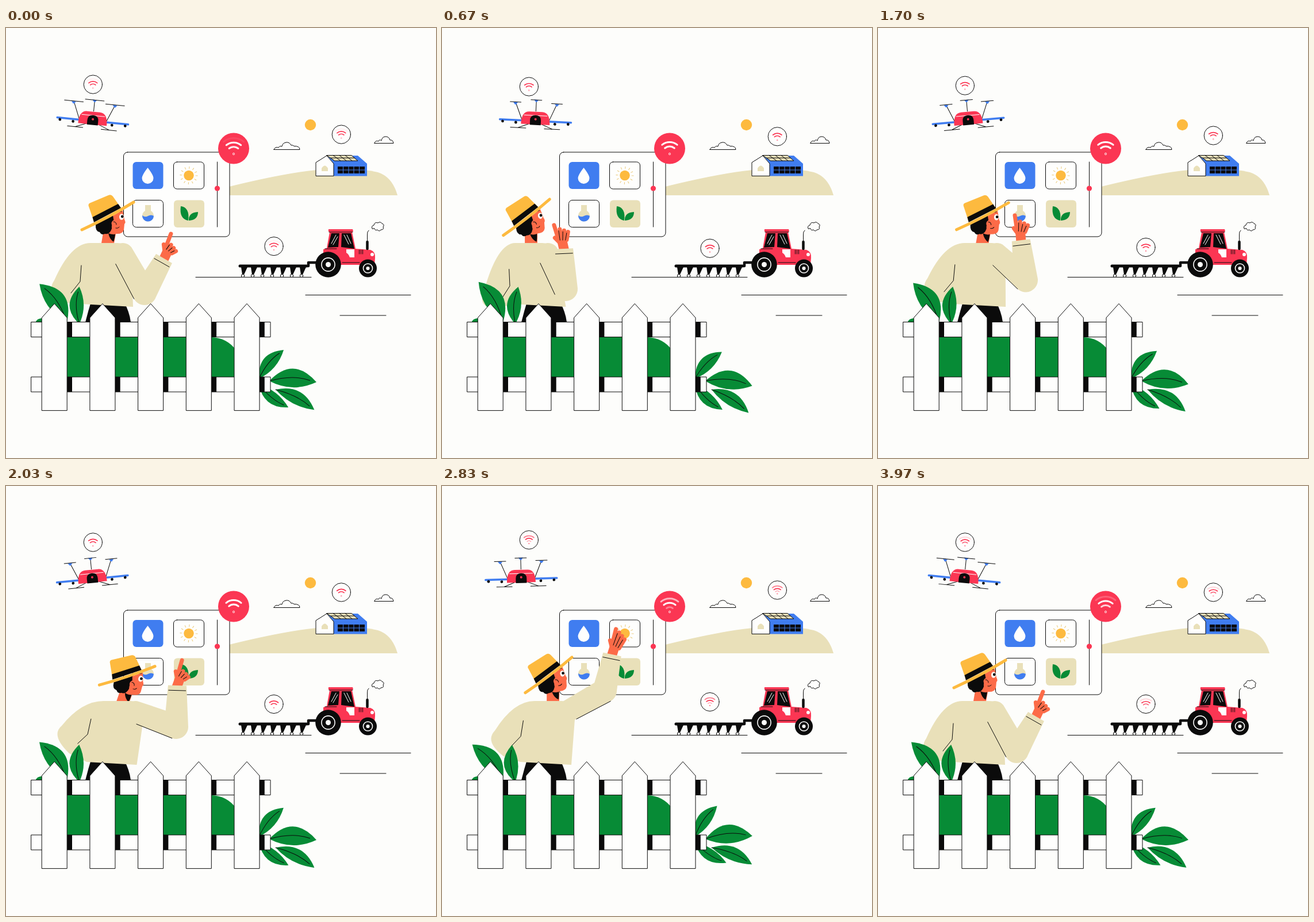
Animation of 748 by 748 pixels, one loop 4010 ms. Source, as an HTML page:

```html
<!DOCTYPE html>
<html lang="en">
<head>
<meta charset="utf-8">
<title>Smart farm</title>
<style>
html, body { margin: 0; width: 100%; height: 100%; overflow: hidden; background: #fdfdfb; }
svg { display: block; width: 100vw; height: 100vh; fill: none; stroke-linecap: round; stroke-linejoin: round; }
.k { fill: #0b0b0b; } .w { fill: #fefefd; } .r { fill: #fb3653; } .b { fill: #407df0; }
.g { fill: #078b36; } .s { fill: #e9e0b9; } .o { fill: #fdba3f; } .f { fill: #fc6b48; }
.l { stroke: #0b0b0b; stroke-width: 1; }
</style>
</head>
<body>
<svg viewBox="0 0 748 748">
  <!-- hill, sky and barn -->
  <path class="s" d="M380 291V278Q480 253 540 247Q605 241 647 251Q672 259 681 291Z"/>
  <circle class="o" cx="529.5" cy="168.5" r="9.7"/>
  <path class="l w" d="M466 211.500H511Q511 205 501 205.500Q499 203 496 204Q493 198 487 199Q481 200 480 206Q476 204 474 208Q468 206 466 211.500Z"/>
  <path class="l w" d="M641 200.500H674Q673 194 668 195Q666 188 659 189Q654 190 653 196Q650 193 648 197Q642 195 641 200.500Z"/>
  <path class="b" d="M559 222H612L628 236V257.500H570V236Z"/>
  <path class="l s" d="M558 221.500H601L612 231H572Z"/>
  <path class="l" d="M565 226H606M569 221.500L582 231M580 221.500L592 231M590 221.500L602 231"/>
  <path class="l w" d="M539 257V234L558 222L570 236V257Z"/>
  <path class="s" d="M549 249V244Q554.500 235 560 244V249Z"/>
  <path class="k" d="M577 241H624V253H577Z"/>
  <path d="M577 247H624M586.500 241V253M596 241V253M605 241V253M614.500 241V253" stroke="#407df0"/>

  <!-- field and tractor -->
  <path class="l" d="M330 433.500H531M521 464.500H704M581 500H661"/>
  <g id="teeth"></g>
  <path d="M407 414H522" stroke="#0b0b0b" stroke-width="5"/>
  <path d="M523 414H526V408H546" stroke="#0b0b0b" stroke-width="4.500"/>
  <path class="r" d="M552 385L558 383L563 355Q560 355 561 350H603Q605 355 602 355L608 384L634 386Q643 389 642 400L641 412H552Z"/>
  <path class="k" d="M566 357H580L578 381L560 382ZM584 357H600L606 384L583 381Z"/>
  <path d="M562 355H603" class="l"/>
  <path d="M566 375L574 360M569 377L577 363M588 360L596 376M593 360L600 375" stroke="#fff"/>
  <path class="w" d="M592 385H606V399H598Q596 393 592 391Z"/>
  <path class="l" d="M555 384H575M614.500 386V393M617.500 386V393M620.500 386V393M585 408H615"/>
  <circle class="w" cx="637" cy="394" r="3"/>
  <path d="M628.500 372V384" stroke="#0b0b0b" stroke-width="4.500"/>
  <path class="l" d="M628.500 370V360Q628 354 631 352"/>
  <path class="l w" d="M637 349Q635 344 640 343Q641 337 647 339Q651 336 654 340Q659 342 656 346Q658 351 652 351Q650 355 646 351Q642 353 641 349Z"/>
  <g id="wheels"></g>

  <g id="drone">
    <path d="M-62 0H-20M20 0H62" stroke="#407df0" stroke-width="3.500"/>
    <path d="M-24 -2L-36 -31M24 -2L36 -31M0 -17V-36" class="l"/>
    <path class="b" d="M-40 -31H-32L-35 -27H-37ZM32 -31H40L37 -27H35ZM-4 -37H4L1 -33H-1Z"/>
    <path class="l" id="props"/>
    <path class="l" d="M-43 13H-16M16 13H43M-10 5L-30 13M10 5L30 13"/>
    <path class="r" d="M-25 6Q-25 -16 -11 -16H11Q25 -16 25 6Z"/>
    <path d="M-20 -9.500H20" stroke="#fff"/>
    <path class="k" d="M-9.500 7V-1Q-9.500 -10 0 -10Q9.500 -10 9.500 -1V7Z"/>
    <circle class="r" cy="-3" r="2"/>
    <g class="k"><circle cx="-57" cy="3" r="2.400"/><circle cx="-34" cy="4" r="2.400"/><circle cx="34" cy="4" r="2.400"/><circle cx="57" cy="3" r="2.400"/></g>
  </g>

  <!-- control panel -->
  <rect class="l w" x="204.500" y="216" width="184.500" height="147" rx="7"/>
  <rect class="b" x="220.500" y="233" width="53" height="47" rx="6"/>
  <path class="w" d="M246.500 243Q256.500 256 256.500 261A10 10 0 0 1 236.500 261Q236.500 256 246.500 243Z"/>
  <rect class="l w" x="291.500" y="233" width="53" height="47" rx="6"/>
  <circle class="o" cx="318" cy="256.500" r="8.700"/>
  <circle cx="318" cy="256.500" r="13.500" stroke="#e9c878" stroke-width="4" stroke-dasharray="1 6.070" stroke-linecap="butt"/>
  <rect class="l w" x="220.500" y="299.500" width="53" height="47" rx="6"/>
  <path class="s" d="M242 308H252V318A10 10 0 1 1 242 318Z"/>
  <path class="b" d="M237 326Q242 330 247 327Q252 324 257 327A10 10 0 0 1 237 326Z"/>
  <rect class="s" x="292" y="299.500" width="53" height="47.500" rx="6"/>
  <path class="g" d="M317 335Q320 312 304 310Q301 332 317 335ZM318 335Q317 321 334 320Q334 334 318 335Z"/>
  <path class="l" d="M367.500 233V346"/>
  <circle class="r" cx="367.500" cy="279" r="4.600"/>
  <circle class="r" cx="396" cy="209.500" r="27"/>
  <g id="signals"></g>

  <!-- farmer -->
  <path class="k" d="M148 476H205Q215 494 217 512H138Q143 492 148 476Z"/>
  <g id="head">
    <path class="f" d="M178 331L203 317L206 333Q209 338 206 341L205 351Q203 359 191 358L187 380H165L170 350Z"/>
    <path class="k" d="M178 357Q185 360 190 358.500Q189 367 187 372Q180 367 178 357Z"/>
    <path class="k" d="M156 342L186 326L188 338Q183 340 184 349Q180 360 172 358Q166 361 163 355Q155 354 156 342Z"/>
    <circle class="f" cx="190" cy="340" r="6.500"/>
    <path class="l" d="M187 337Q192 337 192 342M191 348Q195 349 197 346M196 320L201 319"/>
    <ellipse class="w" cx="201" cy="328.500" rx="4" ry="5.300"/>
    <circle class="k" cx="202.300" cy="328" r="2.400"/>
    <path class="o" d="M153 337L143.500 309Q143 306 146 304.500L178 291Q183 289 186 293L200 313Z"/>
    <path class="k" d="M150.500 329L195 306L200 313L153 338Z"/>
    <path d="M132 351Q178 330 222 303" stroke="#fdba3f" stroke-width="5"/>
  </g>
  <g id="hand" stroke="#fc6b48">
    <path d="M0 8V-14" stroke-width="17"/>
    <path d="M-4 -11L-11 -22" stroke-width="7"/>
    <path id="fingers" stroke-width="7"/>
    <path class="l" id="gaps"/>
  </g>
  <path class="s" id="body"/>
  <path class="l" id="folds"/>

  <!-- garden -->
  <g id="leaves"></g>
  <path class="g" d="M84 538H358Q384 539 400 560V607H84ZM52 511Q54 505 64 505V511Z"/>
  <g id="fence"></g>
</svg>
<script>
const LOOP = 4010, TAU = Math.PI * 2;
const $ = id => document.getElementById(id);
const times = (n, fn) => Array.from({ length: n }, (_, i) => fn(i)).join('');
const mix = (a, b, k) => a + (b - a) * k;

$('teeth').innerHTML = times(7, i => {
  const x = 412 + i * 17;
  return `<path class="k" d="M${x - 3} 416H${x + 8}L${x + 2} 429H${x - 1}Z"/><circle class="l w" cx="${x}" cy="431" r="2.7"/>`;
});

const wheel = (x, y, r) => `<g transform="translate(${x} ${y})"><circle class="k" r="${r}"/>
  <circle r="${r * .52}" stroke="#fff" stroke-width="1.6"/><circle class="w" r="${r * .2}"/></g>`;
$('wheels').innerHTML = wheel(560.5, 411.5, 22.3) + wheel(629.5, 418, 15.5);

$('fence').innerHTML = [511.5, 607].map(y =>
  `<rect class="l w" x="44" y="${y}" width="416" height="26"/>` +
  times(5, i => `<rect class="k" x="${106 + i * 83.7}" y="${y}" width="9" height="26"/>`)
).join('') + times(5, i => {
  const x = 62.2 + i * 83.7;
  return `<path class="l w" d="M${x} 665V504L${x + 22} 479.5L${x + 44} 504V665Z"/>`;
});

// a leaf grows along its own x axis, fuller on one side
const leaf = (x, y, angle, length, bulge) => {
  $('leaves').insertAdjacentHTML('beforeend', `<g>
    <path class="g" d="M0 0Q${length / 2} ${-bulge} ${length} 0Q${length / 2} ${bulge * .45} 0 0"/>
    <path class="l" d="M0 0Q${length / 2} ${-bulge * .28} ${length * .86} ${-bulge * .06}"/></g>`);
  const node = $('leaves').lastElementChild;
  return sway => node.setAttribute('transform', `translate(${x} ${y}) rotate(${angle + 5.2 * sway})`);
};
const leaves = [
  leaf(106, 512, -125.6, 82, -46), leaf(127.5, 515, -90, 65, 34),
  leaf(440, 610, -49.3, 66, 32), leaf(458, 614, 1.4, 82, 45),
  leaf(469, 629, 27.6, 76, 32), leaf(440, 620, 38, 65, -28)
];

// the arcs rest, then once a quarter loop ripple outward by one step
function signal(x, y, scale, float) {
  $('signals').insertAdjacentHTML('beforeend', `<g stroke="${float ? '#fb3653' : '#fff'}" stroke-width="3">` +
    (float ? '<circle cy="-11" r="27.8" class="l w" style="stroke-width:1.7"/>' : '') +
    '<path/><path/><path/><circle r=".4"/></g>');
  const node = $('signals').lastElementChild, arcs = node.querySelectorAll('path');
  return (t, sway) => {
    const phase = (t + 300) % (LOOP / 4), p = phase < 330 ? phase / 330 : 0;
    node.setAttribute('transform', `translate(${x} ${y + float * sway}) scale(${scale})`);
    arcs.forEach((arc, k) => {
      const r = 5.5 + 7.5 * (k + p), dx = r * .64, dy = -r * .77;
      arc.setAttribute('d', `M${-dx} ${dy}A${r} ${r} 0 0 1 ${dx} ${dy}`);
      arc.setAttribute('opacity', [p, 1, 1 - p][k]);
    });
  };
}
const signals = [
  signal(396, 219, 1, 0), signal(151.3, 104.5, .58, 4.5),
  signal(583.3, 191.5, .58, 4.2), signal(466, 386, .58, 4.2)
];

// lean: sideways shift of the neck; turn: head angle; aim: hand angle
const point  = { lean: 0, turn: 0, elbowX: 241, elbowY: 461, wristX: 275, wristY: 401, aim: 25, curl: 1 };
const think  = { lean: -22, turn: -9.8, elbowX: 215, elbowY: 454, wristX: 212, wristY: 384, aim: -13, curl: .4 };
const ponder = { lean: -14, turn: -6.8, elbowX: 224, elbowY: 455, wristX: 207, wristY: 388, aim: -25, curl: .2 };
const press  = { lean: 26, turn: 9.5, elbowX: 296, elbowY: 419, wristX: 298, wristY: 347, aim: 20, curl: 1 };
const reach  = { lean: 16, turn: -9.2, elbowX: 283, elbowY: 356, wristX: 296, wristY: 293, aim: 18, curl: 0 };
// [arrives, leaves, pose]
const acts = [
  [0, 100, point], [620, 760, think], [1200, 1450, ponder],
  [1980, 2230, press], [2740, 2890, reach], [3340, LOOP, point]
];

function poseAt(t) {
  const i = acts.findLastIndex(([arrives]) => arrives <= t);
  const [, leaves, from] = acts[i];
  if (t <= leaves) return from;
  const [arrives, , to] = acts[i + 1];
  const k = .5 - Math.cos(Math.PI * (t - leaves) / (arrives - leaves)) / 2;
  return Object.fromEntries(Object.keys(from).map(key => [key, mix(from[key], to[key], k)]));
}

// tapered sleeve section with round or flat far end, and points along its edges
function limb(x, y, r, u, v, q, flat) {
  const d = Math.hypot(u - x, v - y), nx = (v - y) / d, ny = (x - u) / d;
  const at = (k, side) => {
    const w = side * mix(r, q, k);
    return `${mix(x, u, k) + nx * w} ${mix(y, v, k) + ny * w} `;
  };
  const far = flat ? 'L' : `A${q} ${q} 0 0 1 `;
  return { at, shape: `M${at(0, 1)}L${at(1, 1)}${far}${at(1, -1)}L${at(0, -1)}A${r} ${r} 0 0 1 ${at(0, 1)}Z` };
}

function drawFarmer(t) {
  const { lean, turn, elbowX, elbowY, wristX, wristY, aim, curl } = poseAt(t);
  // a point that follows the lean by the given shares
  const p = (x, y, kx, ky = 0) => `${x + kx * lean} ${y + ky * lean} `;
  $('head').setAttribute('transform', `translate(${lean} ${.08 * Math.abs(lean)}) rotate(${turn} 176 374)`);

  const shoulderX = 203 + .85 * lean;
  const upper = limb(shoulderX, 393, 19, elbowX, elbowY, 21);
  const fore = limb(elbowX, elbowY, 21, wristX, wristY, 16, true);
  const torso = `M${p(130, 480, .4)}L${p(102, 478, .3, -.5)}Q${p(68, 462, .35, -1.1)}${p(84, 439, .5, -.85)}` +
    `Q${p(113, 373, .75)}${p(148, 374, .9)}L${p(194, 374, .9)}` +
    `Q${shoulderX + 13} 375 ${shoulderX + 15} 398L${p(221, 485, .25)}Z`;
  $('body').setAttribute('d', torso + upper.shape + fore.shape);
  $('folds').setAttribute('d',
    `M${upper.at(.12, -1)}L${upper.at(1, -1)}M${fore.at(.88, -.9)}L${fore.at(.88, .9)}` +
    `M${p(131, 413, .65, -.3)}L${p(129, 441, .5, -.35)}L${p(113, 461, .45, -.5)}`);

  $('hand').setAttribute('transform', `translate(${wristX} ${wristY}) rotate(${aim})`);
  let fingers = '', gaps = '';
  for (let i = 0; i < 4; i++) {
    const x = -5.5 + 4.6 * i, y = -17 + i;
    const length = (27 - 3 * i) * (i ? 1 - .55 * curl : 1);
    const a = (i - .7) * .1 + i * curl * .14, dx = Math.sin(a) * length, dy = -Math.cos(a) * length;
    fingers += `M${x} ${y}l${dx} ${dy}`;
    if (i) gaps += `M${x - 2.3} ${y}l${dx * .9} ${dy * .9}`;
  }
  $('fingers').setAttribute('d', fingers);
  $('gaps').setAttribute('d', gaps);
}

function drawDrone(t, sway) {
  const tilt = 5.7 * Math.cos(TAU * t / LOOP);
  $('drone').setAttribute('transform', `translate(${150.8 + 13.5 * sway} 161.7) rotate(${tilt})`);
  const half = 13 + 3.5 * Math.cos(TAU * 15 * t / LOOP);
  $('props').setAttribute('d', [-36, 0, 36]
    .map(x => `M${x - half} ${x ? -31.5 : -36.5}h${half * 2}`).join(''));
}

const start = performance.now();
function frame(now) {
  const t = Math.max(0, now - start) % LOOP, sway = Math.sin(TAU * t / LOOP);
  drawFarmer(t);
  drawDrone(t, sway);
  signals.forEach(draw => draw(t, sway));
  leaves.forEach(draw => draw(sway));
  requestAnimationFrame(frame);
}
frame(start);
</script>
</body>
</html>
```
